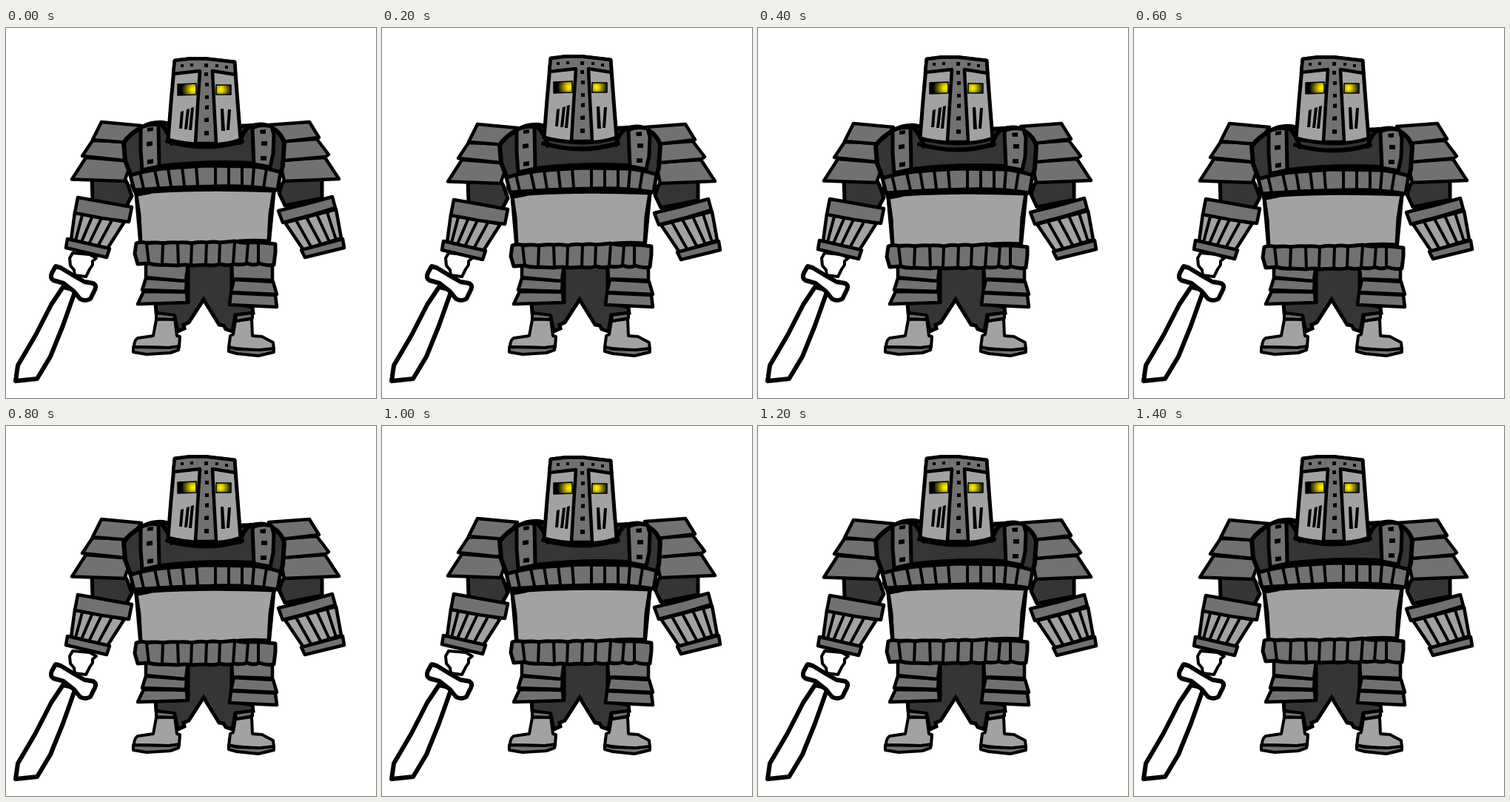
Write an HTML page that moves like this. It is 500 by 500 pixels and loops after 1600 ms.

```html
<!DOCTYPE html>
<html lang="en">
<head>
<meta charset="utf-8">
<title>Breathing knight</title>
<style>
html, body { margin: 0; width: 100%; height: 100%; overflow: hidden; background: #fff; }
svg { display: block; width: 100vw; height: 100vh; stroke: #000; stroke-width: 5; stroke-linejoin: round; stroke-linecap: round; }
.light { fill: #a2a2a2; }
.mid { fill: #717171; }
.dark { fill: #353535; }
.white { fill: #fff; }
.line { fill: none; }
.rivet { fill: #000; stroke: none; }

#head, #arms, #torso { animation: 1600ms step-end infinite; }
#head { animation-name: head; }
#arms { animation-name: arms; }
#torso { animation-name: torso; }

@keyframes head {
  0% { transform: translateY(0); }
  12.5% { transform: translateY(-3px); }
  25% { transform: translateY(-2px); }
  50% { transform: translateY(0); }
  62.5% { transform: translateY(1px); }
  75%, 100% { transform: translateY(0); }
}
@keyframes arms {
  0% { transform: translateY(0); }
  12.5% { transform: translateY(3px); }
  25% { transform: translateY(2px); }
  50% { transform: translateY(-1px); }
  62.5% { transform: translateY(-2px); }
  75%, 100% { transform: translateY(0); }
}
@keyframes torso {
  0% { transform: translateY(0); }
  12.5% { transform: translateY(3px); }
  25% { transform: translateY(4px); }
  37.5% { transform: translateY(5px); }
  50% { transform: translateY(2px); }
  62.5% { transform: translateY(1px); }
  75% { transform: translateY(0); }
  87.5% { transform: translateY(-1px); }
  100% { transform: translateY(0); }
}
</style>
</head>
<body>
<svg viewBox="0 0 500 500">
  <defs>
    <radialGradient id="eyeL" gradientUnits="userSpaceOnUse" cx="253" cy="83" r="16">
      <stop offset="0" stop-color="#fff000"/><stop offset=".2" stop-color="#e6d800"/><stop offset="1" stop-color="#000"/>
    </radialGradient>
    <radialGradient id="eyeR" gradientUnits="userSpaceOnUse" cx="290" cy="83" r="15">
      <stop offset="0" stop-color="#fff000"/><stop offset=".2" stop-color="#e6d800"/><stop offset="1" stop-color="#000"/>
    </radialGradient>
  </defs>

  <g id="sword" class="white">
    <path stroke-width="4" d="M90 304L86 311L87 321L92 327L93 334L108 336L113 326L117 320V315L122 311L113 306Z"/>
    <path stroke-width="6" d="M77 350L61 374L40 415L16 456L13 477L42 474L60 444L77 402L94 354Z"/>
    <path stroke-width="6" d="M67 322L74 324L92 335L106 343L118 345Q123 348 120 354L114 366Q107 370 100 366L92 356L78 345L64 341Q59 338 62 331Z"/>
  </g>

  <g id="legs">
    <path class="dark" stroke-linejoin="miter" d="M202 372L246 370V312H305V372L333 377L334 385L310 388L306 410L297 407L294 402L288 401L267 367L247 398L240 401L241 406L232 410L228 390L203 385Z"/>
    <g stroke-width="4">
      <path class="light" d="M203 394L228 393L231 416L235 417L234 431L220 432L173 431Q173 422 178 419L199 416Z"/>
      <path class="mid" d="M172 431L220 432L234 430L233 435L222 439L190 441L172 438Z"/>
      <path class="mid" d="M203 385L228 388L227 394L203 393Z"/>
      <path class="light" d="M310 396L332 393L333 416L346 417L361 425L362 434L342 436L301 432L303 416L307 414Z"/>
      <path class="mid" d="M301 431L313 434L343 435L362 433V438L341 443L312 440L301 437Z"/>
      <path class="mid" d="M310 388L333 385V392L311 396Z"/>
    </g>
    <g class="mid" stroke-width="4.500">
      <path d="M186 356L244 357L245 371L178 373Z"/>
      <path d="M189 338L244 342L243 356L184 354Z"/>
      <path d="M189 318H246L243 342L189 337Z"/>
      <path d="M304 358L364 361L366 377L302 374Z"/>
      <path d="M308 340L361 343L366 360L304 357Z"/>
      <path d="M305 318H360V341L306 339Z"/>
    </g>
  </g>

  <g id="arms">
    <path class="dark" d="M116 203H160L164 210L170 227L162 242L117 233Z"/>
    <path class="dark" d="M427 203H378L373 211L369 223L377 240L427 230Z"/>
    <g class="mid" stroke-width="4.500">
      <path d="M108 175L170 180L160 207L89 204.500Z"/>
      <path d="M117 152L170 154V180L103 173Z"/>
      <path d="M129 127L183 132L166 155L117 151Z"/>
      <path d="M431 175L370 179L376 207L450 204Z"/>
      <path d="M420 150L365 154L376 179L432 174L436 171Z"/>
      <path d="M410 127L355 131L372 154L423 148Z"/>
    </g>
    <g stroke-width="4.500">
      <path class="light" d="M93 249L160 262L137 298L88 286Z"/>
      <path class="line" stroke-width="4" d="M103 253L94 287M116 256L102 289M128 259L112 292M142 262L124 295"/>
      <path class="mid" d="M83 285L140 298L136 310L81 297Z"/>
      <path class="mid" d="M97 229L120 233L170 242L166 262L130 257L93 250Z"/>
      <path class="light" d="M377 263L446 245L453 284L402 300Z"/>
      <path class="line" stroke-width="4" d="M392 260L413 297M406 256L426 293M420 252L437 289M434 249L446 286"/>
      <path class="mid" d="M399 300L455 285L457 297L404 310Z"/>
      <path class="mid" d="M441 228L445 243L412 253L374 263L368 247L405 238Z"/>
    </g>
  </g>

  <g id="torso">
    <path class="dark" stroke-width="6" d="M159 155Q167 143 184 134Q197 127 212 128L235 133H310L333 132Q349 128 360 135Q372 142 376 155L374 186L370 200H169L161 179Z"/>
    <path class="line" stroke-width="6" d="M209 129Q221 142 224 156M330 132Q319 140 316 155M218 153Q268 168 319 153M209 187Q270 180 333 183"/>
    <path class="mid" d="M182 135Q193 129 206 131L207 187L184 192L182 165Z"/>
    <path class="mid" d="M333 135Q345 129 359 133L362 144L361 170L357 188L335 184L334 160Z"/>
    <path class="rivet" d="M191 135l8-1v5l-8 1zM190 154l8-1v6l-8 1zM191 178l8-1v6l-8 1zM343 138l8-1v6l-7 0zM345 153l8 0v6l-8 0zM344 173l8 0v6l-8 0z"/>
    <path fill="#000" d="M170 212L176 225L182 294H355L362 222L367 212Z"/>
    <path class="light" d="M176 225Q185 224 197 221Q270 216 362 220L357 252L355 288Q330 286 305 289Q270 292 230 291L182 290L180 253Z"/>
    <path class="mid" d="M168 199Q195 191 225 189L270 186L330 187Q350 188 371 195L367 219Q330 213 285 214Q225 215 173 219Z"/>
    <path class="line" stroke-width="4" d="M181 195L186 217M201 192L206 215M219 190L223 214M238 188L241 213M257 187L259 213M283 187V213M301 187V213M319 187V213M335 188L333 214M352 191L348 216"/>
    <path class="mid" d="M176 291Q183 288 191 291Q202 289 212 291Q222 289 232 290Q242 289 251 291Q261 288 271 290Q280 288 289 290L309 288Q318 291 327 290Q342 289 364 292V303L362 320Q352 322 342 318Q335 322 326 318Q318 321 308 319Q299 322 289 319Q280 322 270 320L251 321Q242 319 232 321L212 320Q202 321 192 318L178 319L174 305Z"/>
    <path class="line" stroke-width="4" d="M190 292L193 318M212 292L211 319M232 291L233 320M251 292L250 320M271 291L270 319M289 291L288 318M309 290L307 318M327 291L325 317M341 291V317"/>
  </g>

  <g id="head">
    <path class="light" d="M228 44L248 41.500H270L309 46L313 100L317 151Q297 158 270 158Q240 157 219 151L223 100Z"/>
    <path class="mid" stroke-width="4.500" d="M228 44L248 41.500H270L309 46L310 63L279 58L281 100L284 156L256 156L259 105L262 58L226 62Z"/>
    <path class="rivet" d="M236 49h4v4h-4zM249 48h4v4h-4zM268 48h5v5h-5zM283 49h4v4h-4zM296 51h4v4h-4zM268 60h5v5h-5zM269 74h5v5h-5zM269 91h5v5h-5zM269 105l5-1v6h-5zM268 122l6-1v6h-6zM268 139h6v6h-6z"/>
    <path fill="url(#eyeL)" stroke-width="1.500" d="M232 76L257 75V90L232 91Z"/>
    <path fill="url(#eyeR)" stroke-width="1.500" d="M284 77L304 77V90H284Z"/>
    <path class="rivet" d="M236 113l4-1l-2 24h-4zM244 110l4-1l-3 28h-4zM250 108l4-1l-3 31h-4zM290 109l4 0l2 30h-5zM300 110l4 0l-2 28h-4z"/>
  </g>
</svg>
</body>
</html>
```
